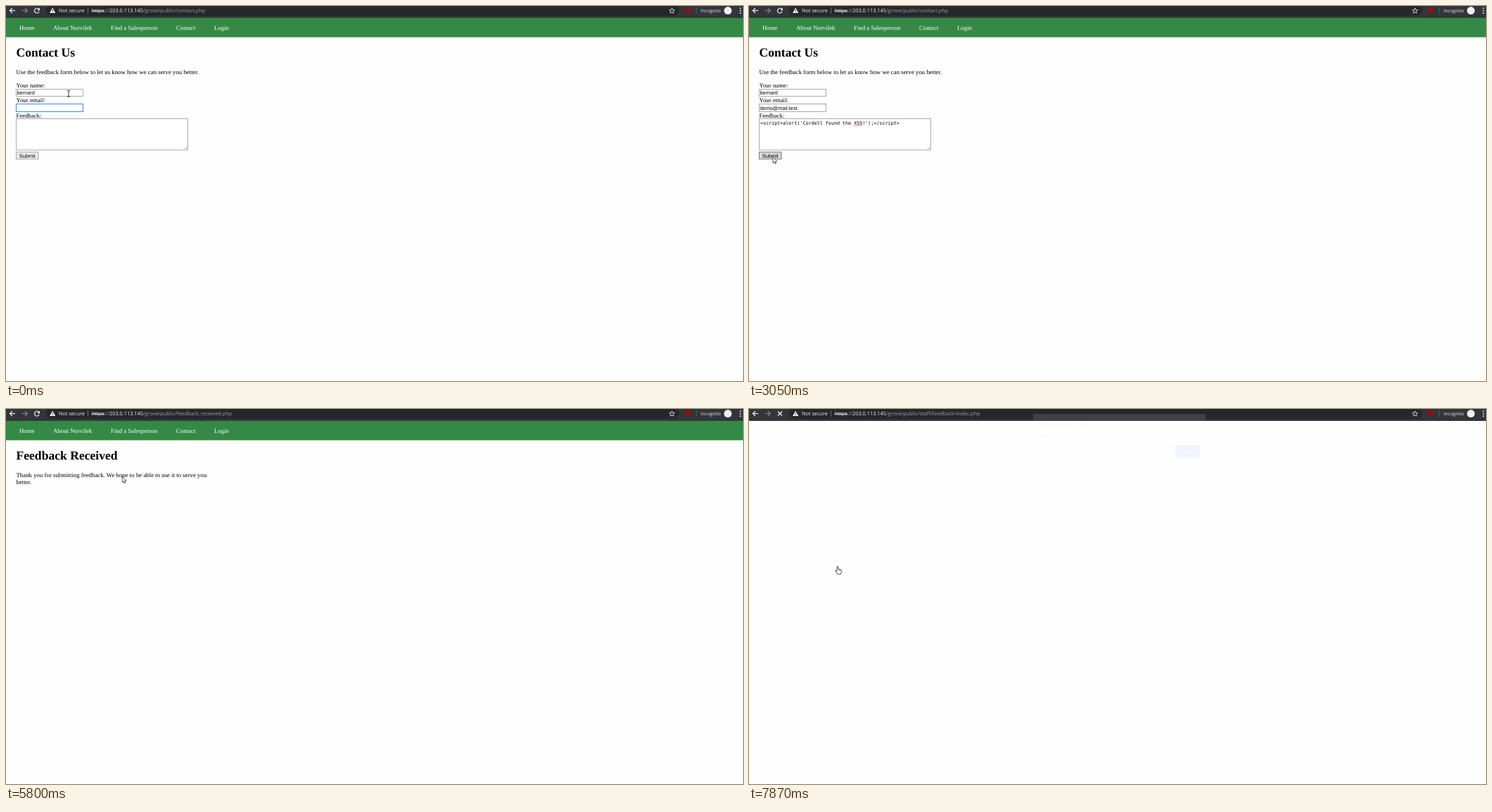
An HTML page with a canvas that plays this animation: 1048 by 534 pixels, repeating every 7990 ms.

```html
<!DOCTYPE html>
<html lang="en">
<head>
<meta charset="utf-8">
<title>Feedback form walkthrough</title>
<style>
html, body { margin: 0; width: 100%; height: 100%; overflow: hidden; background: #fefefe; }
canvas { display: block; }
</style>
</head>
<body>
<canvas id="stage" width="1048" height="534"></canvas>
<script>
const ctx = document.getElementById('stage').getContext('2d');
const LOOP = 7990;
const SERIF = '"Liberation Serif", "Times New Roman", serif';
const ARIAL = '"Liberation Sans", Arial, sans-serif';
const UI = '"Open Sans", "Noto Sans", sans-serif';
const MONO = '"DejaVu Sans Mono", monospace';
const HOST = '203.0.113.145';
const EMAIL = 'demo@mail.test';
const SCRIPT = "<script>alert('Cordell found the XSS!');<\/script>";
const BLUE = '#4285e8';

// [start, characters typed in the email field]
const typing = [[0, 0], [250, 1], [370, 2], [520, 4], [800, 6], [940, 8], [1090, 9], [1370, 10], [1520, 14]];

// [start, x, y, shape]
const pointer = [
  [0, 89, 125, 'beam'], [2350, 88.5, 125, 'beam'], [2500, 62, 166, 'beam'], [2630, 43, 203, 'beam'],
  [2780, 37, 209, 'arrow'], [2900, 34, 215, 'arrow'], [3710, 46, 216, 'arrow'], [3830, 54.5, 217, 'arrow'],
  [4100, 54.5, 212.5, 'arrow'], [4250, 59, 210, 'arrow'], [4370, 64.5, 208.5, 'arrow'],
  [5800, 165.3, 96, 'arrow'], [5930, 224.5, 59, 'arrow'], [6070, 266.5, 48, 'arrow'],
  [6220, 282, 42, 'arrow'], [6340, 294, 36, 'arrow'], [6460, 303, 32, 'hand'], [6580, 305, 29, 'hand'],
  [6720, 307.3, 30.3, 'arrow'], [6840, 255, 150, 'arrow'], [6960, 185, 252, 'arrow'],
  [7080, 122, 239, 'arrow'], [7230, 108, 228, 'hand'], [7350, 106, 226, 'hand'], [7870, 122.6, 223.6, 'hand']
];

const at = (steps, t) => steps.reduce((hit, step) => (step[0] <= t ? step : hit));

function rect(x, y, w, h, color) {
  ctx.fillStyle = color;
  ctx.fillRect(x, y, w, h);
}

function box(x, y, w, h, fill, border) {
  rect(x, y, w, h, fill);
  ctx.strokeStyle = border;
  ctx.lineWidth = 1;
  ctx.strokeRect(x, y, w, h);
}

function disc(x, y, r, color) {
  ctx.fillStyle = color;
  ctx.beginPath();
  ctx.arc(x, y, r, 0, 7);
  ctx.fill();
}

function line(points, color, width = 1, close = false) {
  ctx.beginPath();
  points.forEach(([x, y]) => ctx.lineTo(x, y));
  if (close) ctx.closePath();
  ctx.strokeStyle = color;
  ctx.lineWidth = width;
  ctx.stroke();
}

function fillPoly(points, color) {
  ctx.beginPath();
  points.forEach(([x, y]) => ctx.lineTo(x, y));
  ctx.fillStyle = color;
  ctx.fill();
}

// Draws a string and returns the x where it ends.
function text(str, x, y, color = '#000', size = 8.8, face = SERIF, weight = '') {
  ctx.font = `${weight} ${size}px ${face}`;
  ctx.fillStyle = color;
  ctx.fillText(str, x, y);
  return x + ctx.measureText(str).width;
}

function caret(x, y) {
  rect(x, y, 0.8, 8, '#000');
}

function toolbar(path, loading) {
  rect(0, 0, 1048, 17, '#323539');
  ctx.fillStyle = '#25272b';
  ctx.beginPath();
  ctx.roundRect(57, -2, 900, 16, 8);
  ctx.fill();

  const white = '#f1f1f1', grey = '#85898e';
  line([[13, 6.5], [5.5, 6.5]], white, 1.2);
  line([[9, 3], [5.5, 6.5], [9, 10]], white, 1.2);
  line([[23, 6.5], [30.5, 6.5]], grey, 1.1);
  line([[27, 3], [30.5, 6.5], [27, 10]], grey, 1.1);
  if (loading) {
    line([[41, 3.5], [47, 9.5]], white, 1.3);
    line([[47, 3.5], [41, 9.5]], white, 1.3);
  } else {
    ctx.beginPath();
    ctx.arc(44, 6.6, 3.4, 0.4, 5.5);
    ctx.strokeStyle = white;
    ctx.lineWidth = 1.2;
    ctx.stroke();
    fillPoly([[48, 2.5], [48, 6.2], [44.3, 6.2]], white);
  }

  fillPoly([[66.2, 2.6], [70.4, 10], [62, 10]], white);
  rect(65.8, 5, 0.9, 2.4, '#25272b');
  rect(65.8, 8.2, 0.9, 0.9, '#25272b');
  text('Not secure', 75, 9.3, white, 7.3, UI);
  rect(116, 2, 1, 9, '#6b6e73');
  const size = 7.35;
  let x = text('https', 122, 9.3, white, size, UI);
  line([[121.5, 7.2], [x + 0.5, 7.2]], white, 0.9);
  x = text('://', x, 9.3, '#a0a4a9', size, UI);
  x = text(HOST, x, 9.3, white, size, UI);
  text('/grove/public/' + path, x, 9.3, '#9aa0a6', size, UI);

  const star = [];
  for (let i = 0; i < 10; i++) {
    const a = i * Math.PI / 5 - Math.PI / 2, r = i % 2 ? 1.8 : 4;
    star.push([947 + r * Math.cos(a), 6.9 + r * Math.sin(a)]);
  }
  line(star, white, 0.8, true);
  disc(969, 6.3, 3.7, '#a5090c');
  rect(981, 2, 1, 9, '#55585c');
  text('Incognito', 988, 9, white, 6.55, UI);
  disc(1026.5, 6.6, 5.5, white);
  [3.2, 6.7, 10.2].forEach(y => disc(1044.3, y, 1, white));
}

function nav(items) {
  rect(0, 17, 1048, 27.5, '#348a45');
  items.forEach(([label, x, color = '#fff']) => text(label, x, 34.3, color));
}

function publicNav() {
  nav([['Home', 19], ['About Norvilek', 67], ['Find a Salesperson', 149], ['Contact', 242], ['Login', 296]]);
}

function title(str) {
  text(str, 14.5, 72.4, '#000', 17.6, SERIF, 'bold');
}

function contactPage(t) {
  toolbar('contact.php', t >= 3170);
  publicNav();
  title('Contact Us');
  text('Use the feedback form below to let us know how we can serve you better.', 14.5, 96.6);
  text('Your name:', 14.5, 115.5);
  text('Your email:', 14.5, 137);
  text('Feedback:', 14.5, 158.5);

  const inEmail = t < 1640, inArea = !inEmail && t < 3050;
  box(14.5, 118.5, 95, 10, '#fff', '#a9a9a9');
  text('bernard', 15.5, 126, '#000', 7.35, ARIAL);
  box(14.5, 139.5, 95, 11, '#fff', inEmail ? BLUE : '#a9a9a9');
  const typed = at(typing, t)[1];
  const end = text(EMAIL.slice(0, typed), 15.5, 147.5, '#000', 7.35, ARIAL);
  if (inEmail && typed) caret(end, 140.8);

  box(14.5, 160.5, 244, 44.5, '#fff', inArea ? BLUE : '#a9a9a9');
  line([[253.5, 204], [257.5, 200]], '#888', 0.7);
  line([[256, 204], [257.5, 202.5]], '#888', 0.7);
  if (t >= 2200) {
    const stop = text(SCRIPT, 16, 169, '#000', 6.71, MONO);
    if (t < 2500) caret(stop, 162.5);
    const wave = [];
    for (let x = 149.5; x <= 161.5; x++) wave.push([x, 170.4 + (wave.length % 2 ? 0.5 : -0.5)]);
    line(wave, '#e03030', 0.7);
  } else if (inArea) {
    caret(16.2, 162.5);
  }

  const hover = t >= 2780, down = t >= 3050;
  box(14.5, 208, 31.5, 10, down ? '#d8d8d8' : hover ? '#e4e4e4' : '#ededed', hover ? '#7c7c7c' : '#a6a6a6');
  text('Submit', 18.8, 215.7, '#000', 7.35, ARIAL);

  if (t >= 250 && t < 520) {
    box(14.5, 151.5, 95, 30, '#fff', '#c4c4c4');
    text(EMAIL, 19, 169, '#000', 7.35, ARIAL);
  }
}

function receivedPage() {
  toolbar('feedback_received.php', false);
  publicNav();
  title('Feedback Received');
  text('Thank you for submitting feedback. We hope to be able to use it to serve you', 14.5, 96.6);
  text('better.', 14.5, 106.6);
}

function menuPage(t) {
  toolbar('staff/index.php', t >= 7350);
  nav([['Public Site', 19], ['Staff Menu', 84], ['Logout', 151, '#e8251c']]);
  title('Menu');
  ['Users', 'Salespeople', 'Countries, States, & Territories', 'Feedback'].forEach((label, i) => {
    const y = 89 + i * 38.67;
    rect(14.3, y, 128.2, 27.4, i === 3 && t >= 7230 ? '#3e70e0' : '#4a7dfc');
    text(label, 23, y + 16.6, '#fff');
  });
}

function alertPage() {
  toolbar('staff/feedback/index.php', true);
  rect(404, 7, 245.5, 10, '#3e4145');
  text(HOST + ' says', 412, 25, '#f5f5f5', 7.6, UI);
  text('XSS', 412, 40, '#f7f7f7', 6.5, UI);
  ctx.fillStyle = '#f0f5fe';
  ctx.beginPath();
  ctx.roundRect(606, 52, 36, 18, 2);
  ctx.fill();
  text('OK', 619.2, 63.5, '#fdfeff', 6.6, UI);
}

const shapes = {
  beam() {
    line([[-2.2, -4.5], [2.2, -4.5]], '#222', 0.8);
    line([[0, -4.5], [0, 4.2]], '#222', 1);
    line([[-2.2, 4.2], [2.2, 4.2]], '#222', 0.8);
  },
  arrow() {
    const p = [[0, 0], [0, 8.6], [1.9, 6.9], [3.2, 9.9], [4.5, 9.3], [3.2, 6.4], [5.9, 6.2]];
    fillPoly(p, '#fff');
    line(p, '#222', 0.75, true);
  },
  hand() {
    const p = [[2.4, 0.8], [3.3, 0.3], [4, 1], [4, 4.2], [8.2, 5.2], [8.8, 6], [8.6, 8.8],
      [7.7, 11.6], [3.4, 11.6], [0.7, 7.6], [0.6, 6.6], [1.4, 6.3], [2.4, 7.2]];
    fillPoly(p, '#fff');
    line(p, '#222', 0.8, true);
    [5.3, 6.9].forEach(x => line([[x, 4.6], [x, 6.4]], '#222', 0.6));
  }
};

function draw(t) {
  rect(0, 0, 1048, 534, '#fefefe');
  ctx.textRendering = 'geometricPrecision';
  if (t < 3440) contactPage(t);
  else if (t < 6720) receivedPage();
  else if (t < 7870) menuPage(t);
  else alertPage();

  const [, x, y, shape] = at(pointer, t);
  ctx.save();
  ctx.translate(x, y);
  shapes[shape]();
  ctx.restore();
}

const start = performance.now();
function tick() {
  draw((performance.now() - start) % LOOP);
  requestAnimationFrame(tick);
}
tick();
</script>
</body>
</html>
```
